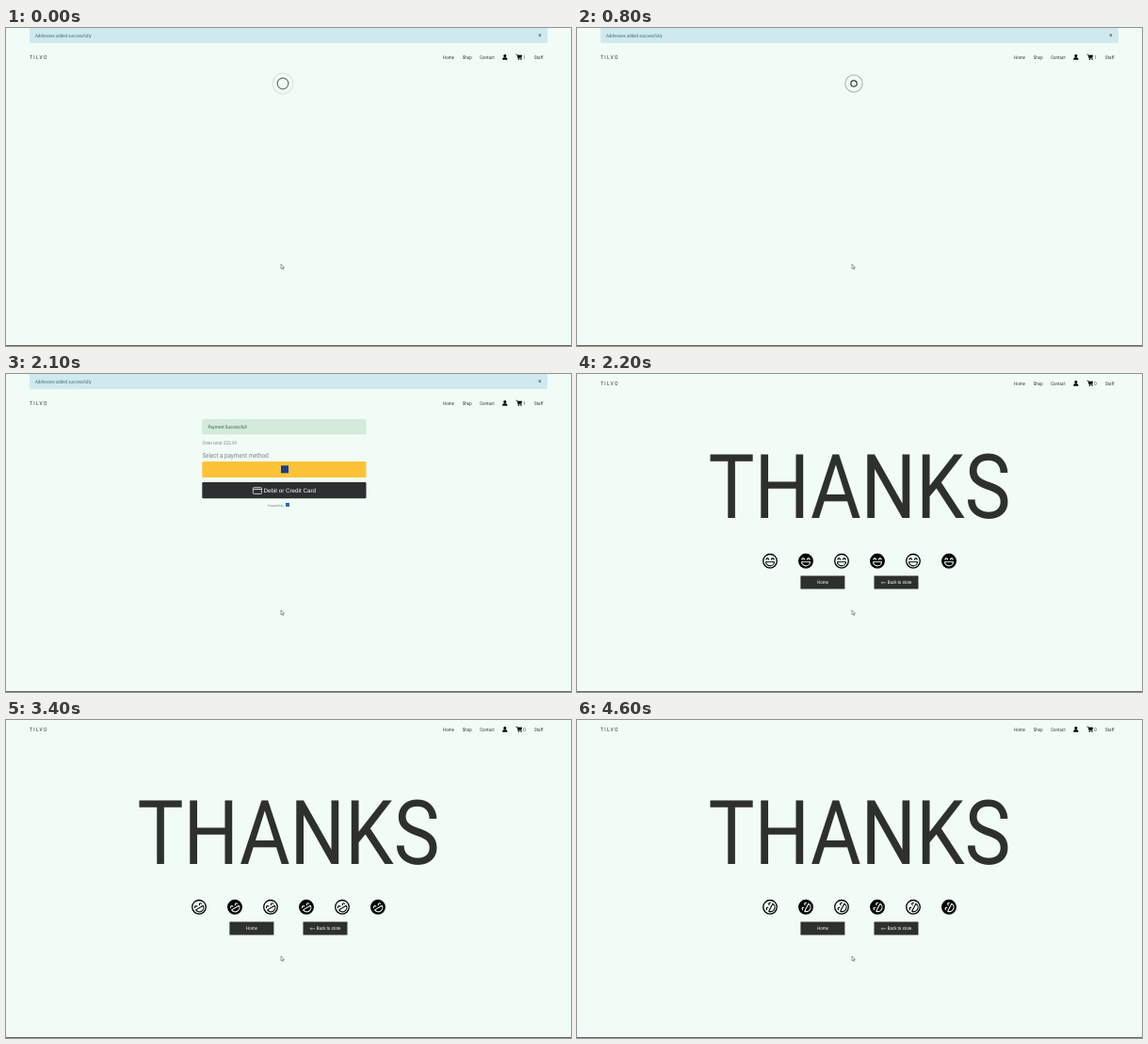
Recreate the animation shown at these times as an HTML page. Size 600 by 338 pixels, loop 4.7 s.

```html
<!DOCTYPE html>
<html lang="en">
<head>
<meta charset="utf-8">
<title>Checkout</title>
<style>
  html, body { margin: 0; width: 100%; height: 100%; overflow: hidden; background: #f0fcf5; }
  svg { display: block; width: 600px; height: 338px; }
  text { font: 5.1px Roboto, sans-serif; text-rendering: geometricPrecision; white-space: pre; }
  .plain { font-family: "Liberation Sans", Arial, sans-serif; }
</style>
</head>
<body>
<svg id="stage" viewBox="0 0 600 338"></svg>
<script>
const LOOP = 4700, STEP = 100, PAY_AT = 1200, THANKS_AT = 2200;
const INK = '#2e302c', NARROW = 0.865;
const stage = document.getElementById('stage');

const rect = (x, y, w, h, fill, r = 0) =>
  `<rect x="${x}" y="${y}" width="${w}" height="${h}" rx="${r}" fill="${fill}"/>`;

// All page text shares one condensed look.
const text = (x, y, s, fill = INK, style = '', attrs = '') =>
  `<text transform="translate(${x} ${y}) scale(${NARROW} 1)" fill="${fill}" style="${style}" ${attrs}>${s}</text>`;

const header = `
  ${text(25, 33, 'TILVO', INK, 'font-size:5.8px;letter-spacing:1.5px')}
  ${text(464, 32.7, 'Home')}${text(484.7, 32.7, 'Shop')}
  ${text(503.2, 32.7, 'Contact')}${text(561, 32.7, 'Staff')}
  <circle cx="529.8" cy="29.6" r="1.5"/>
  <path d="M527.2 33.8v-.8q0-1.7 1.7-1.7h1.8q1.7 0 1.7 1.7v.8z"/>
  <path d="M541.5 28.2h1.5l.9 4h3.7" fill="none" stroke="#000" stroke-width=".7"/>
  <path d="M543.1 28.8h5l-.8 2.9h-3.6z"/>
  <circle cx="544.3" cy="33.3" r=".7"/><circle cx="547" cy="33.3" r=".7"/>
  ${text(549.2, 32.9, '1', INK, '', 'id="count"')}`;

const notice = rect(25, -2, 550, 18, '#d0e9ee', 1.2) +
  text(31, 9.8, 'Addresses added successfully', '#3a6b75') +
  text(565.2, 9.6, '×', '#4f6a70', 'font-size:7px;font-weight:700');

const payment = `
  ${rect(208.3, 48, 174.2, 16.2, '#d3ebda', 1.2)}
  ${text(214.5, 57.8, 'Payment Successfull', '#35633f')}
  ${text(208.4, 74.8, 'Order total: £23.99', '#7d868c')}
  ${text(208.4, 88.8, 'Select a payment method', '#7d858d', 'font-size:7.2px')}
  ${rect(208.3, 93, 174.2, 17, '#fec238', 1.2)}
  ${rect(292, 97.3, 8, 8, '#17408f')}
  ${rect(208.3, 115, 174.2, 17.3, '#2c2e2f', 1.2)}
  <g id="card">
    <rect x="262.4" y="120.6" width="9" height="6.8" rx=".8" fill="none" stroke="#fff" stroke-width=".7"/>
    ${rect(262.4, 122.1, 9, 0.8, '#fff')}
    <text class="plain" x="273.4" y="126" fill="#fff" style="font-size:6.25px">Debit or Credit Card</text>
  </g>
  <text class="plain" x="278" y="140.5" fill="#666b6b" style="font-size:3.2px;font-style:italic">Powered by</text>
  ${rect(297, 137, 4, 4, '#1a6fb5')}`;

function face(i) {
  const solid = i % 2, line = solid ? '#f0fcf5' : '#000';
  return `<g transform="translate(${205 + 38 * i} 198.8)">
    <circle r="7.3" fill="${solid ? '#000' : 'none'}" stroke="#000" stroke-width="1.3"/>
    <g class="spin" fill="none" stroke="${line}" stroke-width="1.1" stroke-linecap="round" stroke-linejoin="round">
      <path d="M-4.2 -1.7q1.4-2.4 2.8 0M1.4 -1.7q1.4-2.4 2.8 0M-4.5 .9h9a4.5 4.2 0 0 1-9 0z"/>
    </g></g>`;
}

const thanks = `
  ${text(300, 153, 'THANKS', INK, 'font-size:95px', 'text-anchor="middle"')}
  ${Array.from({ length: 6 }, (_, i) => face(i)).join('')}
  ${rect(237.4, 214.5, 47, 14, INK)}${rect(315.5, 214.5, 47, 14, INK)}
  ${text(261, 223.2, 'Home', '#fff', '', 'text-anchor="middle"')}
  <path d="M328.2 221.8h-5l1.2-1.1m-1.2 1.1l1.2 1.1" fill="none" stroke="#fff" stroke-width=".5"/>
  ${text(329.7, 223.2, 'Back to store', '#fff')}`;

const ring = '<circle class="ring" cx="294" cy="59" fill="none" stroke="#000" stroke-width="1.25"/>';

stage.innerHTML = `
  ${rect(0, 0, 600, 338, '#f0fcf5')}
  <g id="notice">${notice}</g>
  <g id="header">${header}</g>
  <g id="loader">${ring}${ring}</g>
  <g id="payment">${payment}</g>
  <g id="thanks">${thanks}</g>
  <path d="M292 251v4.9l1.1-1 .8 1.7.8-.4-.8-1.6h1.5z" fill="#fff" stroke="#444" stroke-width=".5"/>
  ${rect(0, 337, 600, 1, '#66636a')}`;

const $ = id => document.getElementById(id);
const show = (id, on) => $(id).setAttribute('display', on ? 'inline' : 'none');
const rings = [...document.querySelectorAll('.ring')];
const spins = document.querySelectorAll('.spin');

// cubic-bezier(0, .2, .8, 1)
function ease(x) {
  let lo = 0, hi = 1;
  for (let i = 0; i < 24; i++) {
    const s = (lo + hi) / 2;
    if (2.4 * (1 - s) * s * s + s ** 3 < x) lo = s; else hi = s;
  }
  const r = 1 - lo;
  return 0.6 * r * r * lo + 3 * r * lo * lo + lo ** 3;
}

function draw() {
  const t = Math.floor(performance.now() % LOOP / STEP) * STEP;
  const done = t >= THANKS_AT;
  show('notice', !done);
  show('loader', t < PAY_AT);
  show('payment', t >= PAY_AT && !done);
  show('thanks', done);
  $('header').setAttribute('transform', `translate(0 ${done ? -21 : 0})`);
  $('count').textContent = done ? 0 : 1;
  $('card').setAttribute('opacity', Math.min(1, 0.8 + Math.max(0, t - PAY_AT) / 1500));
  rings.forEach((el, i) => {
    const v = ease((t / 1000 + 0.32 + i / 2) % 1);
    el.setAttribute('r', 0.625 + 11.25 * v);
    el.setAttribute('opacity', 1 - v);
  });
  const angle = -0.026 * Math.max(0, t - THANKS_AT);
  spins.forEach(el => el.setAttribute('transform', `rotate(${angle})`));
  requestAnimationFrame(draw);
}
draw();
</script>
</body>
</html>
```
